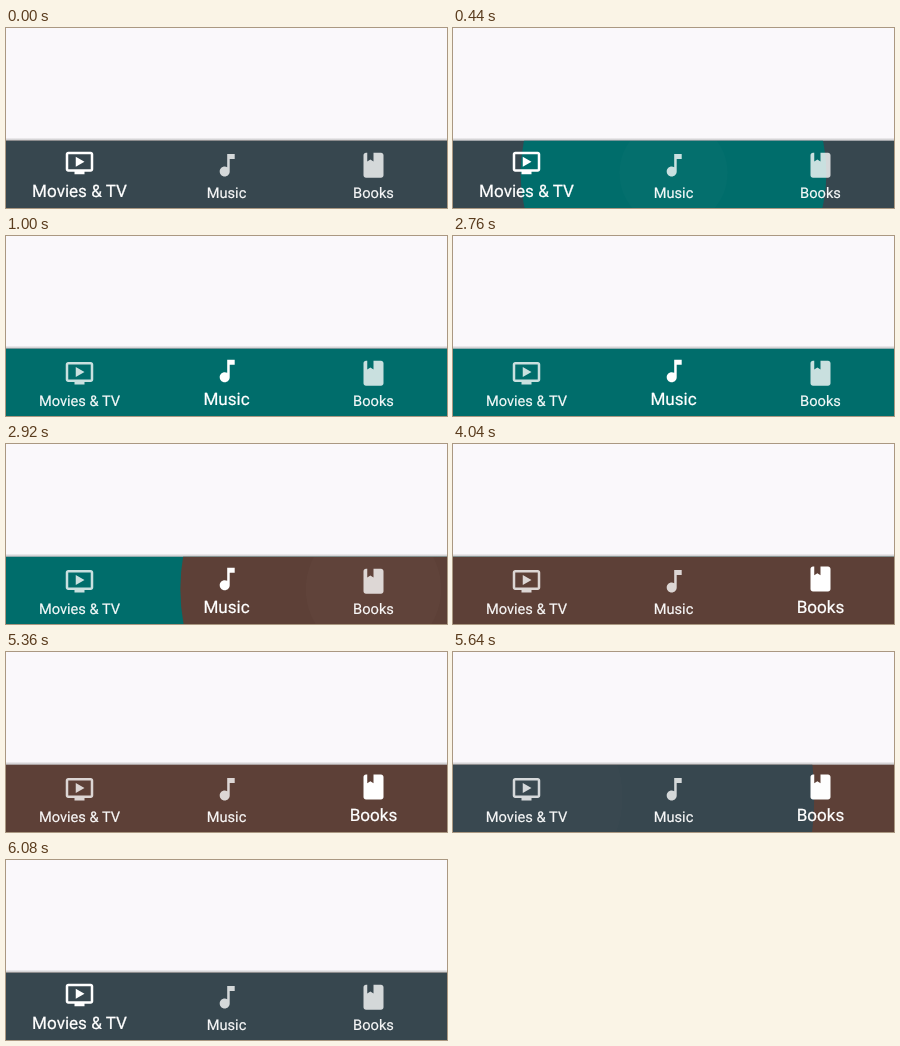
An HTML page that plays this animation: 441x180 px, repeating every 7040 ms.

```html
<!DOCTYPE html>
<html lang="en">
<head>
<meta charset="utf-8">
<title>Bottom navigation</title>
<style>
  html, body { margin: 0; width: 100%; height: 100%; overflow: hidden; background: #faf8fb; }
  svg { display: block; width: 100vw; height: 100vh; }
  text {
    font-family: Roboto, sans-serif; font-size: 14.65px; text-anchor: middle;
    text-rendering: geometricPrecision; stroke: #fff; stroke-width: .2px;
  }
</style>
</head>
<body>
<svg viewBox="0 0 441 180">
  <defs>
    <clipPath id="barClip"><rect y="112.8" width="441" height="67.2"/></clipPath>
    <linearGradient id="shade" x2="0" y2="1">
      <stop offset="0" stop-opacity="0"/>
      <stop offset="1" stop-opacity=".25"/>
    </linearGradient>
  </defs>
  <rect width="441" height="180" fill="#faf8fb"/>
  <rect y="109.5" width="441" height="3.5" fill="url(#shade)"/>
  <g clip-path="url(#barClip)">
    <rect id="bar" y="112" width="441" height="68"/>
    <circle id="reveal" cy="145"/>
    <circle id="ripple" cy="145" fill="#fff"/>
  </g>
  <g id="items" fill="#fff"></g>
</svg>
<script>
const LOOP = 7040, STEP = 40;
const items = [
  { label: 'Movies & TV', x: 73.5, iconX: 58.5, color: '#37474f',
    icon: 'M21 3H3c-1.1 0-2 .9-2 2v12c0 1.1.9 2 2 2h5v2h8v-2h5c1.1 0 2-.9 2-2V5c0-1.1-.9-2-2-2zm0 14H3V5h18v12zm-5-6l-7 4V7z' },
  { label: 'Music', x: 220.5, iconX: 206.2, color: '#006d6b',
    icon: 'M12 3v10.55c-.59-.34-1.27-.55-2-.55-2.21 0-4 1.79-4 4s1.79 4 4 4 4-1.79 4-4V7h4V3h-6z' },
  { label: 'Books', x: 367.5, iconX: 352.5, color: '#5d4037',
    icon: 'M18 2h-6v7l-2.5-1.5L7 9V2H6c-1.1 0-2 .9-2 2v16c0 1.1.9 2 2 2h12c1.1 0 2-.9 2-2V4c0-1.1-.9-2-2-2z' }
];
const taps = [
  { at: -LOOP, from: 2, to: 0 },
  { at: 320, from: 0, to: 1 },
  { at: 2760, from: 1, to: 2 },
  { at: 5360, from: 2, to: 0 }
];

const $ = id => document.getElementById(id);
const clamp = v => Math.min(1, Math.max(0, v));
const mix = (a, b, p) => a + (b - a) * p;
const easeOut = (p, power) => 1 - (1 - p) ** power;
const easeInOut = p => (1 - Math.cos(Math.PI * p)) / 2;

function set(el, attrs) {
  for (const name in attrs) el.setAttribute(name, attrs[name]);
}

function add(tag, attrs) {
  const el = document.createElementNS('http://www.w3.org/2000/svg', tag);
  set(el, attrs);
  return $('items').appendChild(el);
}

for (const item of items) {
  item.path = add('path', { d: item.icon });
  item.text = add('text', {});
  item.text.textContent = item.label;
}

function drawItem(item, active) {
  const iconY = mix(122.2, 119.9, active);
  const baseline = mix(170.1, 168.6, active);
  const size = mix(1, 14 / 12, active);
  set(item.path, {
    transform: `translate(${item.iconX} ${iconY}) scale(1.25)`,
    opacity: mix(0.79, 1, active)
  });
  set(item.text, {
    transform: `translate(${item.x} ${baseline}) scale(${size})`,
    opacity: mix(0.96, 1, active)
  });
}

function draw(time) {
  const tap = taps.findLast(t => t.at <= time);
  const since = time - tap.at;
  const touch = clamp(since / 400);
  const x = items[tap.to].x;

  set($('bar'), { fill: items[tap.from].color });
  set($('reveal'), { cx: x, r: 441 * easeOut(clamp(since / 1470), 5), fill: items[tap.to].color });
  set($('ripple'), { cx: x, r: 106 * easeOut(touch, 2), opacity: 0.025 * (1 - touch) });

  const shift = easeInOut(clamp((since - 240) / 440));
  items.forEach((item, i) =>
    drawItem(item, i === tap.to ? shift : i === tap.from ? 1 - shift : 0));
}

const start = performance.now();
function frame() {
  const time = (performance.now() - start) % LOOP;
  draw(Math.floor(time / STEP) * STEP);
  requestAnimationFrame(frame);
}
frame();
</script>
</body>
</html>
```
